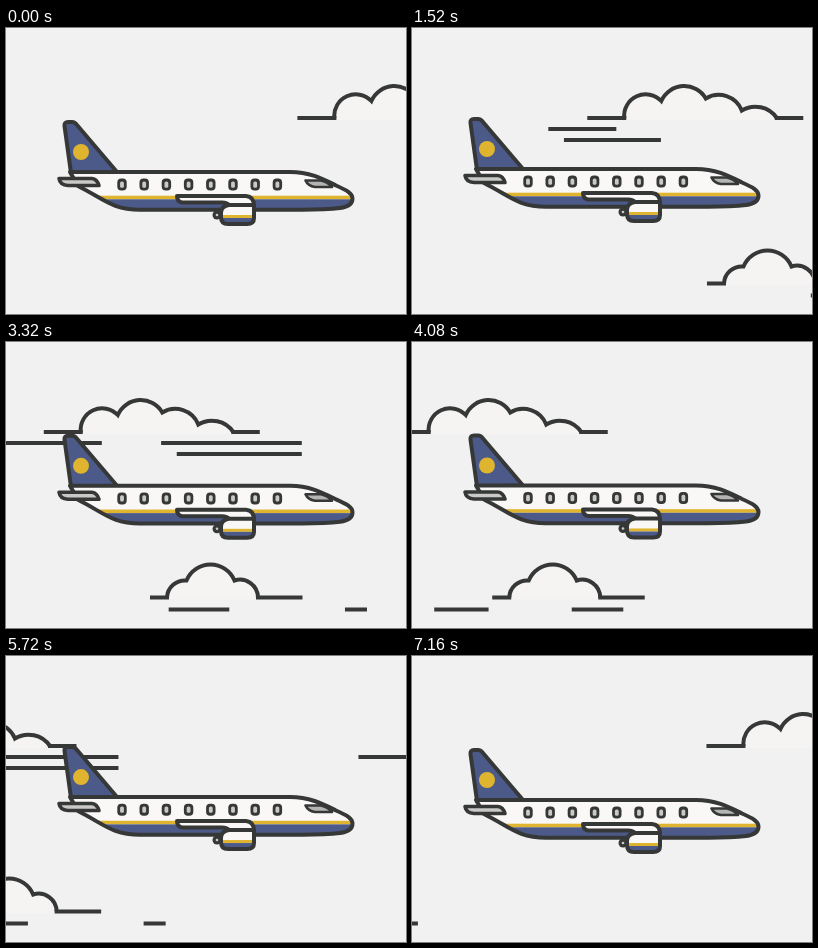
Animation, 400 px wide and 286 px high, one loop 7.2 s. Source, as an HTML page with a canvas:

```html
<!DOCTYPE html>
<html lang="en">
<head>
<meta charset="utf-8">
<title>Plane in flight</title>
<style>
html, body { margin: 0; width: 100%; height: 100%; overflow: hidden; background: #f1f1f1; }
canvas { display: block; width: 400px; height: 286px; }
</style>
</head>
<body>
<canvas id="stage"></canvas>
<script>
const LOOP = 7200, STEP = 40, GUST = 2400, BOB = 3600;
const INK = '#363737', SKY = '#f1f1f1', CLOUD = '#f6f4f3', WHITE = '#faf8f7';
const BLUE = '#4c5a89', GOLD = '#dfb42f', GREY = '#c9c9c8';

const canvas = document.getElementById('stage');
const ctx = canvas.getContext('2d');
const dpr = window.devicePixelRatio || 1;
canvas.width = 400 * dpr;
canvas.height = 286 * dpr;

const clamp = v => Math.min(1, Math.max(0, v));

// A streak is drawn from right to left, then wiped the same way, once per gust.
const streak = (y, birth, grow, delay, wipe) => ({ y, birth, grow, delay, wipe });

const high = {
  start: 291.4, travel: 550, lo: -52, hi: 258,
  base: 90, left: 37, right: 189.5, end: 216,
  path: new Path2D('M37 90A21.5 21.5 0 0 1 74 73A25 25 0 0 1 118.5 70.5A25 25 0 0 1 154.5 82.5A26 26 0 0 1 189.5 90'),
  streaks: [
    streak(101, 0, 920, 651, 417),
    streak(101, 380, 1190, 832, 417),
    streak(112, 440, 1190, 832, 417)
  ]
};
const low = {
  start: 422.5, travel: 604, lo: -58, hi: 217,
  base: 255.5, left: 17, right: 108, end: 152.5,
  path: new Path2D('M17 255.5A18 18 0 0 1 36.5 238.5A26 26 0 0 1 84.5 238.5A18 18 0 0 1 108 255.5'),
  streaks: [
    streak(267.5, 775, 1810, 255, 2080),
    streak(267.5, 2058, 1750, 0, 2520)
  ]
};

function bar(x1, x2, y) {
  ctx.fillStyle = INK;
  ctx.fillRect(x1, y - 2, x2 - x1, 4);
}

function drawStreak(s, layer, t) {
  const span = layer.hi - layer.lo;
  for (let birth = s.birth; birth < t; birth += GUST) {
    const age = t - birth;
    const head = layer.hi - span * clamp(age / s.grow);
    const tail = layer.hi - span * clamp((age - s.delay) / s.wipe);
    if (tail > head) bar(head, tail, s.y);
  }
}

function drawLayer(layer, t) {
  const { base, left, right, end, path, travel } = layer;
  const first = layer.start - travel * t / LOOP;
  for (const x of [first, first + travel]) {
    ctx.save();
    ctx.translate(x, 0);
    ctx.fillStyle = CLOUD;
    ctx.fill(path);
    ctx.fillRect(left, base - 1, right - left, 3);
    ctx.strokeStyle = INK;
    ctx.lineWidth = 4;
    ctx.lineJoin = 'miter';
    ctx.stroke(path);
    bar(0, left + 2, base);
    bar(right - 2, end, base);
    for (const s of layer.streaks) drawStreak(s, layer, t);
    ctx.restore();
  }
}

const body = new Path2D('M64 144H284C304 144 317 151 330 157.5C340 162 346.5 165 346.5 170.5C346.5 176 342 179 334 180Q320 181.7 296 181.7H134C106 181.7 98 171 72 158Z');
const fin = new Path2D('M65 145L58.5 98Q58 94 62 94H66Q69 94 71 97L111 144Z');
const tailplane = new Path2D('M53 150.5H86Q91 151 93 157.5H62Q54 157 53 150.5Z');
const wing = new Path2D('M171 168H240Q248 168.5 248 178H224Q221 174.5 216 174.5H176Q171 173.5 171 168Z');
const engine = new Path2D('M223 177H248V190Q248 196 241 196H222Q215 196 215 189V185Q215 178 223 177Z');
const visor = new Path2D('M299.5 152.5H315Q322 154 326 159H309Q302 158 299.5 152.5Z');

function shape(path, fill, width) {
  ctx.fillStyle = fill;
  ctx.fill(path);
  ctx.strokeStyle = INK;
  ctx.lineWidth = width;
  ctx.lineJoin = 'round';
  ctx.stroke(path);
}

// White shape with a gold stripe and a blue underside.
function livery(path, stripe, height) {
  ctx.save();
  ctx.clip(path);
  ctx.fillStyle = WHITE;
  ctx.fillRect(50, 130, 300, 70);
  ctx.fillStyle = GOLD;
  ctx.fillRect(50, stripe, 300, height);
  ctx.fillStyle = BLUE;
  ctx.fillRect(50, stripe + height, 300, 40);
  ctx.restore();
  shape(path, 'transparent', 4);
}

function pill(x, y, w, h, r, fill) {
  ctx.beginPath();
  ctx.roundRect(x - w / 2, y - h / 2, w, h, r);
  ctx.fillStyle = fill;
  ctx.fill();
}

function disc(x, y, r, fill) {
  ctx.beginPath();
  ctx.arc(x, y, r, 0, Math.PI * 2);
  ctx.fillStyle = fill;
  ctx.fill();
}

function drawPlane(t) {
  ctx.save();
  ctx.translate(0, 1.6 * (Math.cos(2 * Math.PI * t / BOB) - 1));
  shape(fin, BLUE, 4);
  disc(75, 124, 8, GOLD);
  livery(body, 167.7, 3.6);
  for (let i = 0; i < 8; i++) {
    const x = 116 + i * 22.2;
    pill(x, 156.6, 9.4, 12, 4, INK);
    pill(x, 156.6, 3.8, 6.4, 1.6, GREY);
  }
  shape(visor, '#b4b4b4', 2.6);
  shape(tailplane, GREY, 3.6);
  disc(211, 187, 4.5, INK);
  disc(211, 187, 1.3, GREY);
  shape(wing, WHITE, 4);
  livery(engine, 187, 3);
  ctx.restore();
}

function frame(now) {
  const t = Math.floor((now % LOOP) / STEP) * STEP;
  ctx.setTransform(dpr, 0, 0, dpr, 0, 0);
  ctx.fillStyle = SKY;
  ctx.fillRect(0, 0, 400, 286);
  drawLayer(high, t);
  drawLayer(low, t);
  drawPlane(t);
}

const begin = performance.now();
function tick() {
  frame(performance.now() - begin);
  requestAnimationFrame(tick);
}
tick();
</script>
</body>
</html>
```
